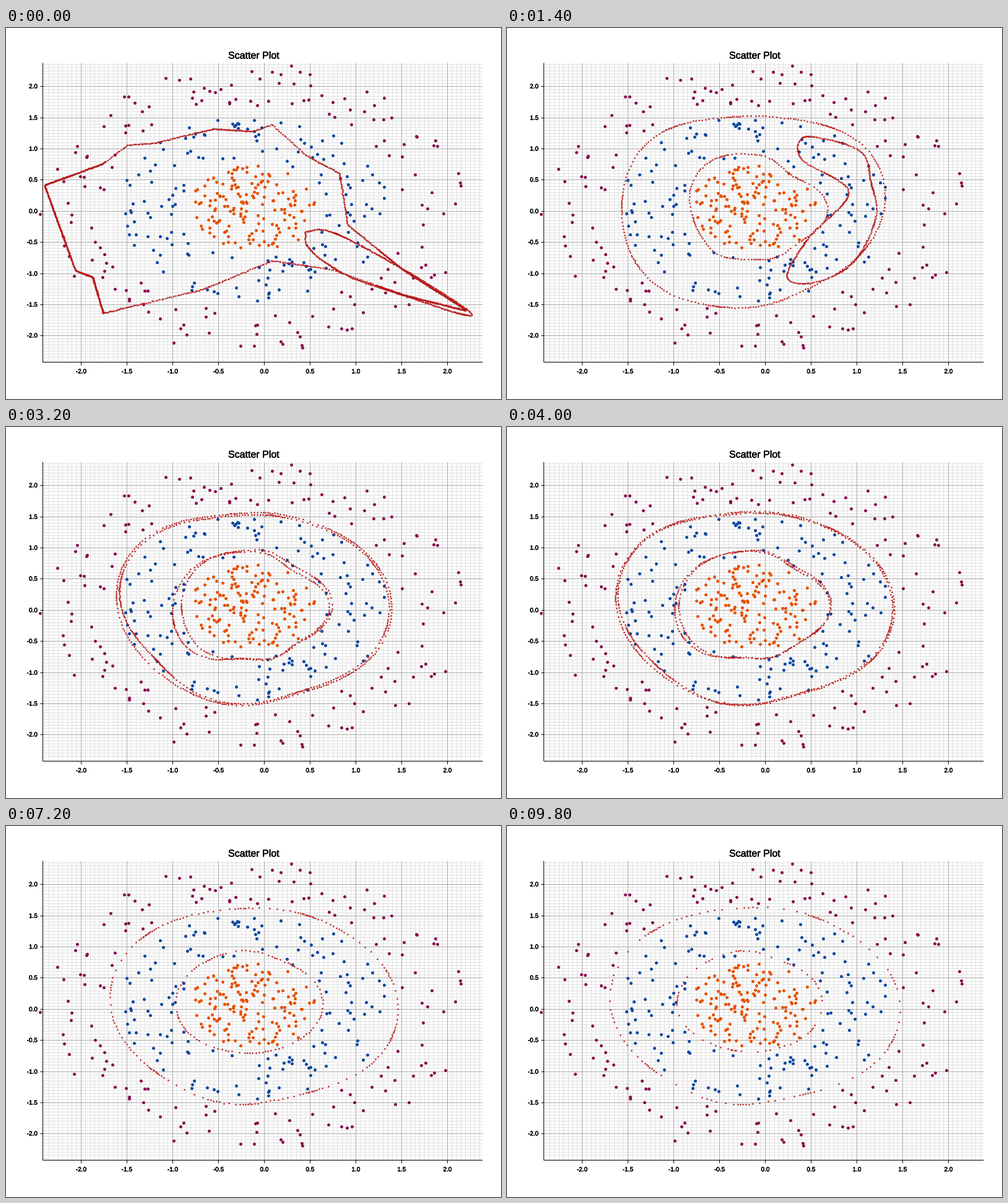
Animation of 800x600 px, one loop 10000 ms. Source, as a matplotlib script:

```python
import numpy as np
import matplotlib.pyplot as plt
from matplotlib import patheffects
from matplotlib.animation import FuncAnimation

FRAMES, STEP = 50, 200
LEFT, RIGHT, TOP, BOTTOM = 60, 770, 56, 540
UX, UY = 148, 100.7              # pixels per axis unit
X0, Y0 = 417.3, 295.32           # axis zero
CENTRE = np.array([400, 292])    # middle of the rings
PX = 72 / 100                    # one pixel in points
TH = np.linspace(0, 2 * np.pi, 1440, endpoint=False)


# ---- scattered classes
def ring(counts, r0, r1, power, seed):
    """Random points between two radii, counted per 30 degree sector."""
    rng = np.random.default_rng(seed)
    sector = np.repeat(np.arange(12), counts)
    ang = (sector + rng.random(len(sector))) * np.pi / 6
    r = r0 + (r1 - r0) * rng.random(len(sector)) ** power
    return CENTRE + np.column_stack([UX * r * np.cos(ang), UY * r * np.sin(ang)])


CLASSES = [
    ("#e65100", ring([11, 10, 11, 9, 12, 14, 17, 16, 17, 13, 9, 11], 0.05, 0.7, 0.65, 11)),
    ("#0d47a1", ring([13, 13, 20, 9, 9, 16, 15, 10, 15, 14, 12, 14], 0.8, 1.48, 0.9, 12)),
    ("#880e4f", ring([10, 12, 18, 10, 13, 13, 14, 12, 17, 18, 15, 13], 1.65, 2.33, 1, 13)),
]


# ---- boundary curves, as radius by angle around the middle
def loop(*r):
    """Smooth radius curve through values at equal angles."""
    c = np.fft.rfft(r)
    c[-1] /= 2
    return np.fft.irfft(c, len(TH)) * len(TH) / len(r)


def polygon(*corners):
    p = np.array(corners, float)
    u = np.linspace(0, 1, 40, endpoint=False)[:, None, None]
    q = (p + u * (np.roll(p, -1, 0) - p)).reshape(-1, 2) - CENTRE
    return np.interp(TH, np.arctan2(q[:, 1], q[:, 0]), np.hypot(*q.T), period=2 * np.pi)


def bump(deg, width):
    return np.exp(-((TH - np.radians(deg)) / width) ** 2)


def to_xy(r):
    return CENTRE + np.column_stack([r * np.cos(TH), r * np.sin(TH)])


START = polygon((62, 254), (155, 220), (197, 189), (240, 186), (335, 163), (400, 167),
                (430, 156), (485, 206), (539, 235), (552, 318), (640, 390), (747, 458),
                (640, 431), (525, 390), (430, 376), (320, 422), (157, 461), (140, 403),
                (112, 392))
OUTER = [loop(209, 178, 154, 159, 177, 208, 215, 205, 166, 150, 164, 203),
         loop(220, 193, 157, 157, 168, 189, 217, 210, 167, 152, 162, 195),
         loop(235, 206, 163, 157, 169, 196, 233, 215, 175, 161, 172, 203)]
INNER = [loop(118, 95, 86, 82, 91, 97, 104, 109, 99, 88, 81, 90),
         loop(132, 100, 91, 87, 101, 132, 132, 120, 101, 95, 94, 107),
         loop(109, 94, 77, 73, 80, 102, 125, 115, 98, 89, 86, 101)]
TWIN = OUTER[1] - 5 - 20 * bump(155, 0.35)

# pocket on the right, same point order in both poses
SPUR = np.array([(488, 329), (530, 331), (640, 389), (747, 457), (727, 460), (640, 431),
                 (560, 404), (510, 375), (488, 354), (484, 345), (484, 336)])
POCKET = np.array([(474, 180), (510, 178), (573, 201), (588, 250), (596, 305), (560, 378),
                   (497, 411), (452, 402), (488, 338), (552, 265), (478, 214)])


def settle(poses, f):
    """First pose to the second, then a slow ease to the last."""
    u = np.clip((f - 7) / 5, 0, 1)
    v = 1 - (1 - np.clip((f - 12) / 37, 0, 1)) ** 2
    a, b, c = poses
    return (1 - u) * a + u * ((1 - v) * b + v * c)


def rounded(p, n=16):
    """Closed Catmull-Rom curve through the points."""
    a, b, c, d = (np.roll(p, k, 0)[:, None] for k in (1, 0, -1, -2))
    t = (np.arange(n) / n)[None, :, None]
    q = b + 0.5 * t * (c - a + t * (2 * a - 5 * b + 4 * c - d + t * (3 * (b - c) + d - a)))
    return q.reshape(-1, 2)


def dots(p, gap, f, seed, dense=1):
    """Dots along a closed curve, bunched into slowly drifting runs."""
    rng = np.random.default_rng(seed)
    q = np.vstack([p, p[:1]])
    length = np.hypot(*np.diff(q, axis=0).T) * dense
    n = max(8, round(length.sum() / gap))
    t = np.cumsum(length) / length.sum()
    amp = np.interp(f, [0, 49], [0.2, 0.45])
    wave = sum(np.sin(2 * np.pi * (k * t + rng.random()) + f * rng.uniform(-0.5, 0.5))
               for k in (5, 9, 14, 23))
    cum = np.concatenate([[0], np.cumsum(length * np.exp(amp * wave))])
    at = (np.arange(n) + rng.random()) / n * cum[-1]
    out = np.column_stack([np.interp(at, cum, q[:, 0]), np.interp(at, cum, q[:, 1])])
    return out + rng.normal(0, 0.3, out.shape)


def boundary(f):
    gap = np.interp(f, [0, 7, 20, 28, 36, 49], [2.4, 4.4, 4.8, 5.3, 6.5, 10])
    outer, inner = settle(OUTER, f), settle(INNER, f)
    split = np.interp(f, [7, 12, 17, 26], [0, 1, 0.4, 0])   # how far the twins part
    morph = np.interp(f, [0, 3, 5, 7], [0, 0.65, 0.94, 1])
    outer = (1 - morph) * START + morph * outer
    outer = outer + 11 * bump(90, 0.5) * np.interp(f, [0, 5, 7], [0, 1, 0])

    p = to_xy(outer)
    far = (p[:, 0] < 160) | (p[:, 0] > 600)
    parts = [dots(p, gap, f, 1, 1 + 3 * (1 - morph) * far)]
    if f >= 3:
        p = to_xy(inner * np.interp(f, [3, 6], [0.5, 1]))
        low = (p[:, 0] < 290) & (p[:, 1] > 312)
        parts.append(dots(p, gap, f, 2, 1 + 2 * split * low))
    if split > 0:
        p = to_xy(outer + split * (TWIN - outer))
        low = (p[:, 0] < 270) & (p[:, 1] > 260)
        parts.append(dots(p, gap, f, 3, 1 + 2 * split * low))
        parts.append(dots(to_xy(inner + split * (INNER[0] - inner)), gap, f, 4))
    if f < 11:
        d = rounded((1 - morph) * SPUR + morph * POCKET) - CENTRE
        rim = np.interp(np.arctan2(d[:, 1], d[:, 0]), TH, outer, period=2 * np.pi)
        pull = np.interp(f, [7, 11], [0, 1])
        p = CENTRE + d * (1 - pull + pull * rim / np.hypot(*d.T))[:, None]
        parts.append(dots(p, np.interp(f, [0, 7, 11], [1.4, 2, 6]), f, 5))
    return np.vstack(parts)


# ---- stage
fig = plt.figure(figsize=(8, 6), dpi=100, facecolor="white")
ax = fig.add_axes([0, 0, 1, 1])
ax.set_xlim(0, 800)
ax.set_ylim(600, 0)
ax.axis("off")


def label(x, y, text, size, ha="center"):
    ax.text(x, y, text, size=size * PX, family="Liberation Sans", ha=ha,
            va="center_baseline", color="black",
            path_effects=[patheffects.withStroke(linewidth=0.35, foreground="black")])


def line(xs, ys, color, z):
    ax.plot(xs, ys, color=color, lw=PX, zorder=z, solid_capstyle="butt")


for k in range(-50, 50):
    x = np.floor(X0 + k * 0.05 * UX)
    y = np.floor(Y0 - k * 0.05 * UY) + 1
    major = k % 10 == 0
    color, z = ("#a9a9a9", 2) if major else ("#e0e0e0", 1)
    if LEFT < x <= RIGHT:
        line([x, x], [TOP, BOTTOM], color, z)
        if major:
            line([x, x], [BOTTOM, BOTTOM + 5], "black", 3)
            label(x + 0.5, 554.5, f"{k / 20:.1f}", 10)
    if TOP <= y < BOTTOM:
        line([LEFT, RIGHT], [y, y], color, z)
        if major:
            line([LEFT - 5, LEFT], [y, y], "black", 3)
            label(51, y - 0.5, f"{k / 20:.1f}", 10, "right")
line([LEFT - 1, LEFT - 1], [TOP, BOTTOM], "black", 3)
line([LEFT - 1, RIGHT], [BOTTOM, BOTTOM], "black", 3)
label(400.5, 43.5, "Scatter Plot", 16)

for color, pts in CLASSES:
    ax.plot(*pts.T, "o", color=color, ms=5 * PX, mew=0, zorder=4)
trail, = ax.plot([], [], "o", color="#b71c1c", ms=2.6 * PX, mew=0, zorder=5)


def update(f):
    trail.set_data(*boundary(f).T)
    return trail,


def init():
    return update(0)


anim = FuncAnimation(fig, update, frames=FRAMES, init_func=init, interval=STEP,
                     repeat=True, repeat_delay=0, blit=False)
plt.show()
```
